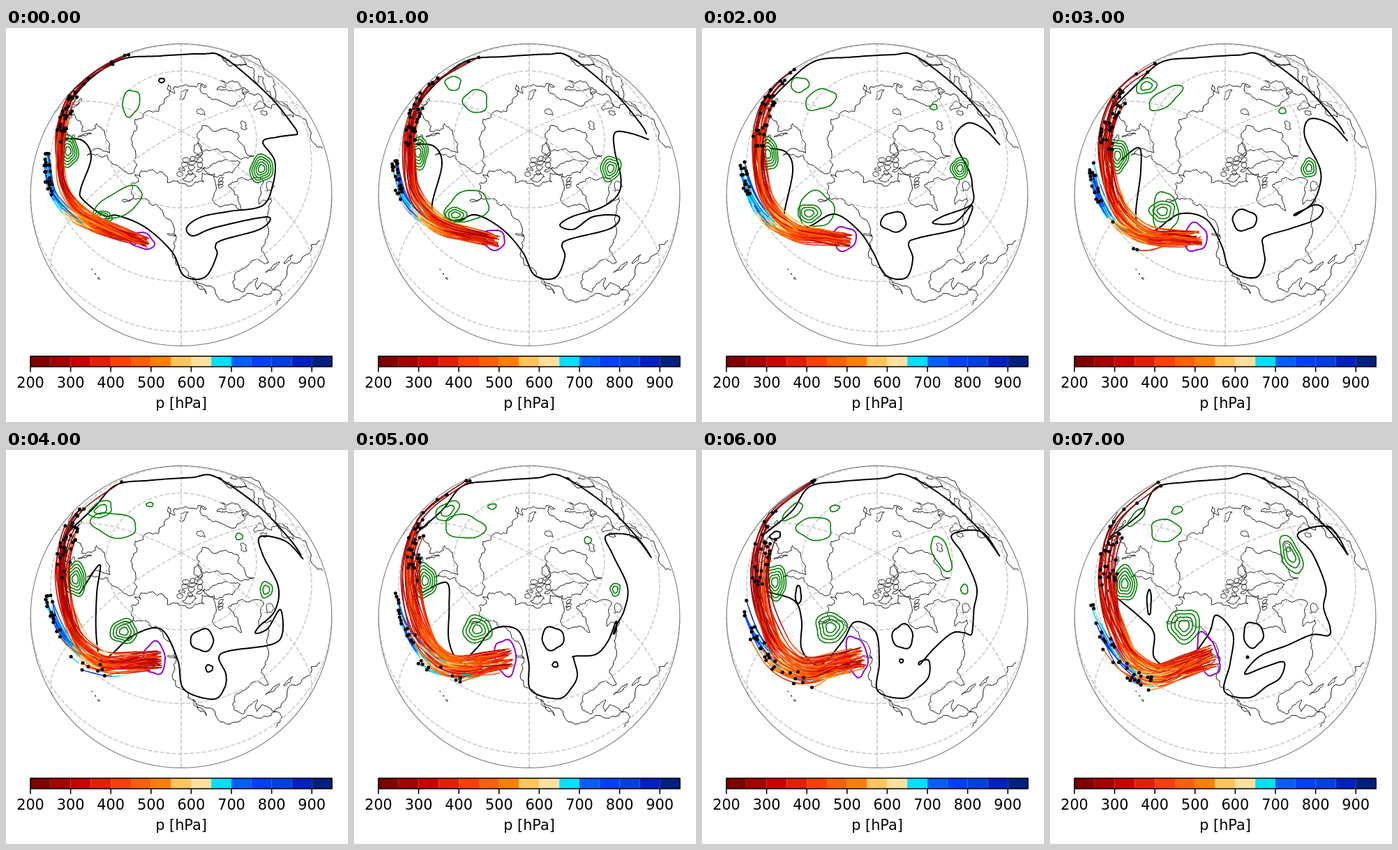
These frames come from a looping animation (490x563 px, 8 s). An HTML page with a canvas:

```html
<!DOCTYPE html>
<html lang="en">
<head>
<meta charset="utf-8">
<title>Air parcel trajectories</title>
<style>
html, body { margin: 0; width: 490px; height: 563px; overflow: hidden; background: #fff; }
canvas { display: block; }
</style>
</head>
<body>
<canvas id="stage" width="490" height="563"></canvas>
<script>
const ctx = document.getElementById('stage').getContext('2d');
const CX = 251, CY = 238.3, R = 215.8, RAD = Math.PI / 180, LAST = 7;
const SIN0 = Math.sin(65 * RAD), COS0 = Math.cos(65 * RAD), LON0 = -120;
const COLORS = ['#800000', '#a40000', '#c80000', '#e02000', '#ff4000', '#ff6000', '#ff8000', '#ffc55a',
  '#ffdf9f', '#00dfff', '#0060ff', '#0040ff', '#0040df', '#0020bf', '#002080'];

const pairs = flat => flat.flatMap((v, i) => i % 2 ? [] : [[v, flat[i + 1]]]);
const lerp = (a, b, f) => a + (b - a) * f;
const mix = (a, b, f) => a.map((v, i) => lerp(v, b[i], f));
const clamp = (v, low, high) => Math.max(low, Math.min(high, v));

function random(seed) {
  return () => {
    seed = seed + 0x6D2B79F5 | 0;
    let t = Math.imul(seed ^ seed >>> 15, 1 | seed);
    t = t + Math.imul(t ^ t >>> 7, 61 | t) ^ t;
    return ((t ^ t >>> 14) >>> 0) / 4294967296;
  };
}

// Catmull-Rom curve through a flat list, sampled at n points
function spline(flat, n) {
  const p = pairs(flat), last = p.length - 1;
  const at = i => p[clamp(i, 0, last)];
  return Array.from({ length: n }, (_, k) => {
    const u = k / (n - 1) * last, i = Math.min(last - 1, Math.floor(u)), f = u - i;
    return [0, 1].map(c => {
      const [a, b, d, e] = [at(i - 1)[c], at(i)[c], at(i + 1)[c], at(i + 2)[c]];
      return b + f / 2 * (d - a + f * (2 * a - 5 * b + 4 * d - e + f * (3 * (b - d) + e - a)));
    });
  });
}

// Orthographic view; null on the far side
function project(lon, lat) {
  const d = (lon - LON0) * RAD, s = Math.sin(lat * RAD), c = Math.cos(lat * RAD);
  if (SIN0 * s + COS0 * c * Math.cos(d) < 0) return null;
  return [CX + R * c * Math.sin(d), CY - R * (COS0 * s - SIN0 * c * Math.cos(d))];
}

function line(points, color, width, closed) {
  ctx.beginPath();
  let pen = false;
  for (const p of points) {
    if (p) pen ? ctx.lineTo(p[0], p[1]) : ctx.moveTo(p[0], p[1]);
    pen = !!p;
  }
  if (closed) ctx.closePath();
  ctx.strokeStyle = color;
  ctx.lineWidth = width;
  ctx.stroke();
}

// Midpoint displacement gives straight pieces a ragged look
function rough(points, rnd, levels, amount) {
  for (; levels--;) {
    points = points.flatMap((p, i) => {
      const q = points[i + 1];
      if (!p || !q) return [p];
      const k = (rnd() - .5) * amount, dx = q[0] - p[0], dy = q[1] - p[1];
      return [p, [(p[0] + q[0]) / 2 - dy * k, (p[1] + q[1]) / 2 + dx * k]];
    });
  }
  return points;
}

const coasts = [], noise = random(5);
const coast = (...flat) => coasts.push(rough(pairs(flat).map(p => project(...p)), noise, 3, .5));

// Ragged oval; sizes and centre in degrees, stretched with the parallels
function island(lon, lat, width, height, slant = 0) {
  const flat = [];
  for (let a = 0; a < 6; a++) {
    const size = .75 + noise() * .5, v = Math.sin(a * 60 * RAD) * size;
    flat.push(lon + (Math.cos(a * 60 * RAD) * size * width + v * slant) / Math.cos(lat * RAD), lat + v * height);
  }
  coast(...flat, flat[0], flat[1]);
}

// North America, west, north and east
coast(-81, -4, -78, 2, -80, 8, -86, 11, -95, 16, -105, 20, -114.8, 31.7, -109.5, 23, -117, 32.5, -122.5, 37.5,
  -124, 46, -123, 49, -133, 57.5, -140, 59.8, -148, 60.5, -154, 59, -163, 54.8, -157.5, 58.7, -165, 62,
  -161, 64.4, -168, 65.6, -162, 66.3, -166, 68.3, -156.5, 71.3);
coast(-156.5, 71.3, -135, 69, -128, 70.2, -114, 68.3, -96, 68.2, -94, 71.5, -82, 69, -86, 66.2, -94.5, 59,
  -82.5, 55, -80, 51.3, -76.8, 56.5, -77.5, 62.4, -70, 61, -64.5, 60.3, -56, 52.5, -69, 48.3, -64.5, 47, -61, 46,
  -66, 44, -70, 42, -75.7, 35.2, -81, 32, -80.5, 25.2, -84, 30, -95, 29.2, -97.7, 22.5, -94, 18.2, -90, 21,
  -87, 21.5, -88.5, 15.9, -84, 15.8, -81, 9, -75.5, 10.7, -62, 10.5, -52, 5);
// Greenland
coast(-73, 78.2, -55, 82.3, -35, 83.5, -12, 81.4, -22, 72.5, -38, 65.8, -43.5, 60, -52, 64.5, -51, 69.5, -60, 76, -73, 78.2);
// Africa and Europe
coast(-17, 15, -14, 26, -6, 35.8, 10, 37.2, 11, 34, 20, 31, 34, 31.3, 36, 36.5, 27, 37, 29, 41, 41, 41.5,
  31, 46.5, 28, 41.5, 23, 37, 13.5, 45.5, 18, 40, 16, 38, 9, 44.2, 0, 40, -2, 37, -9, 37.2, -9, 43, -1.5, 44,
  -4.7, 48.4, 8, 54, 10.5, 57.5, 10, 54.2, 19, 54.4, 23.5, 59.2, 29, 59.8, 22, 61, 25, 65.3, 17.5, 62, 13, 55.5,
  7, 58, 5, 61, 18, 69.5, 26, 71, 41, 66.7, 35, 66.5, 44, 66.3);
// Northern and eastern Asia
coast(44, 66.3, 44, 68.5, 67, 69, 68, 72.5, 73, 67.5, 74.5, 72.8, 104, 77.6, 113, 74, 130, 71, 152, 71, 180, 69,
  190, 66, 177.5, 62.5, 164, 60, 156.7, 51, 156, 57, 162, 61, 142, 59, 136, 54.5, 141, 53, 140, 48, 127.5, 39.5,
  129.3, 36, 126.5, 34.5, 122, 39, 118, 38.5, 122, 37, 120, 34, 122, 30.5, 110, 21);
coast(130, 31.5, 136, 35.7, 140, 41, 142, 39.5, 140, 35, 130, 31.5);

island(-79, 21.5, 4, .6, -1);
island(-71, 19, 2.2, .7);
island(-56, 49, 2, 2);
island(-125.5, 49.5, 1.6, .5, -.6);
island(-19, 65, 2.2, 1.2);
island(-2.5, 54, 1.3, 4, -1);
island(-8, 53.3, 1.3, 1.6);
island(18, 78.5, 1.8, 1.3);
island(57, 73.5, 1, 2.8, 1);
island(143, 43.3, 1.7, 1.2);
island(142.6, 50, .5, 4);
for (let i = 0; i < 3; i++) island(-155.5 - i * 2, 19.6 + i, .5 / (i + 1), .5 / (i + 1));
// Baffin, Victoria, Ellesmere, then the scattered archipelago
island(-73, 69, 4, 5, -4.5);
island(-110, 71, 2.3, 1.6);
island(-78, 80, 2, 2.5, 1);
for (let i = 0; i < 12; i++) island(-122 + i * 3.4, 73 + (i % 4) * 1.7, .8 + noise(), .5 + noise() * .7);
for (let i = 0; i < 3; i++) island(-84 + i * 2, 63.8 + i, 1.2, .7);

// Contour shapes at a few moments, with matching points
const north = [
  [85,115, 118,75, 165,45, 220,40, 280,37, 312,42, 375,95, 412,140, 418,152],
  [85,125, 130,90, 152,54, 195,46, 255,41, 290,35, 350,68, 400,115, 427,150]
];
const south = {
  0: [418,152, 388,156, 368,163, 385,190, 382,225, 367,254, 320,262, 280,270, 259,285, 268,297, 300,285, 374,270,
    365,287, 310,303, 300,312, 302,325, 285,356, 255,354, 238,320, 200,285, 160,268, 140,268, 110,245, 107,230,
    122,185, 108,160, 72,160],
  2: [427,167, 405,145, 380,136, 362,160, 383,205, 387,225, 386,252, 345,269, 331,279, 362,278, 386,254, 384,268,
    370,286, 310,300, 296,308, 302,330, 292,357, 263,353, 245,320, 225,290, 190,266, 155,283, 128,290, 117,272,
    130,205, 121,178, 98,172],
  4: [426,156, 400,130, 364,124, 368,150, 390,195, 385,230, 362,253, 358,262, 375,255, 393,228, 396,262, 380,278,
    320,287, 305,297, 315,320, 313,340, 297,356, 255,342, 246,300, 222,256, 182,265, 150,293, 135,298, 129,260,
    130,205, 134,164, 105,206],
  7: [427,150, 400,110, 355,120, 376,148, 395,195, 392,225, 401,252, 399,265, 375,264, 340,279, 300,295, 279,320,
    308,310, 335,303, 330,325, 310,338, 285,354, 250,345, 258,305, 262,262, 238,236, 226,265, 185,312, 150,298,
    149,262, 130,240, 82,200]
};

function southAt(step) {
  const times = Object.keys(south).map(Number);
  const b = times.find(t => t >= step), a = times.filter(t => t <= step).pop();
  return mix(south[a], south[b], a === b ? 0 : (step - a) / (b - a));
}

// Closed contours [x, y, rx, ry, rings, turn] drift from one state to another
const tracks = [];
const track = (color, from, to, start, end = start) => tracks.push({ color, from, to, start, end });
const GREEN = '#008000', BLACK = '#000', PURPLE = '#9400d3';
track(GREEN, 0, 7, [89, 176, 14, 23, 5, 0], [107, 191, 17, 25, 5, 0]);
track(GREEN, 0, 7, [138, 270, 14, 8, 3, 0], [192, 251, 23, 24, 4, 0]);
track(GREEN, 0, 6, [366, 201, 16, 20, 5, .3], [376, 199, 5, 7, 1, 0]);
track(GREEN, 0, 3, [161, 251, 39, 17, 1, -.5], [165, 264, 18, 30, 1, 0]);
track(GREEN, 0, 3, [179, 107, 12, 19, 1, .2], [165, 100, 28, 11, 1, -.6]);
track(GREEN, 4, 7, [155, 107, 33, 17, 1, .2], [165, 115, 21, 16, 1, 0]);
track(GREEN, 1, 5, [142, 79, 11, 10, 1, 0], [134, 87, 19, 11, 2, -.6]);
track(GREEN, 6, 7, [130, 88, 18, 7, 1, -.7], [124, 96, 17, 6, 1, -.8]);
track(GREEN, 2, 5, [332, 113, 5, 4, 1, 0], [335, 129, 5, 5, 1, 0]);
track(GREEN, 6, 7, [343, 148, 11, 27, 1, -.4], [345, 150, 13, 29, 3, -.4]);
track(GREEN, 4, 7, [206, 78, 5, 3, 1, 0], [182, 86, 8, 5, 1, -.4]);
track(BLACK, 0, 0, [223, 75, 4, 3, 1, 0]);
track(BLACK, 2, 7, [275, 277, 18, 14, 1, 0], [291, 264, 14, 18, 1, 0]);
track(BLACK, 4, 7, [291, 312, 5, 5, 1, 0], [283, 296, 1.5, 1.5, 1, 0]);
track(BLACK, 6, 7, [138, 207, 4, 13, 1, 0], [142, 217, 3, 18, 1, 0]);
track(BLACK, 6, 7, [105, 122, 8, 5, 1, -.4], [90, 130, 8, 5, 1, -.8]);
track(PURPLE, 0, 7, [195, 304, 18, 11, 1, .3], [226, 293, 14, 32, 1, -.28]);

function ring([x, y, rx, ry, count, turn], color) {
  const n = Math.round(count), cos = Math.cos(turn), sin = Math.sin(turn);
  for (let k = 0; k < n; k++) {
    const points = Array.from({ length: 48 }, (_, i) => {
      const a = i * Math.PI / 24;
      const size = (1 - k / n * .9) * (1 + .07 * Math.sin(3 * a + x) + .04 * Math.sin(5 * a + y));
      const u = rx * size * Math.cos(a), v = ry * size * Math.sin(a);
      return [x + u * cos - v * sin, y + u * sin + v * cos];
    });
    line(points, color, color === GREEN ? 1.6 : 2, true);
  }
}

// The air stream, from its head back along the rim of the globe
const stream = [
  [205,308, 170,294, 130,277, 100,255, 82,225, 77,185, 78,145, 92,102, 122,68, 180,38],
  [236,293, 197,306, 152,317, 118,299, 97,267, 81,225, 75,175, 84,122, 108,86, 160,46]
];
const N = 90;

// Parcels in the stream: where they end, their side offset there, and their pressure
function parcels(t, rnd) {
  const list = [], add = (count, make) => { for (let i = 0; i < count; i++) list.push(make()); };
  add(26, () => {
    const base = 230 + 220 * rnd();
    return { end: .62 + .2 * rnd(), side: lerp(-5, 10 + 14 * t, rnd()),
      pressure: u => base + 150 * Math.exp(-(((u - .4) / .2) ** 2)) };
  });
  add(6, () => ({ end: .8 + .2 * rnd(), side: 8 * rnd() - 4, pressure: u => 290 + 70 * Math.sin(u * 5) }));
  add(lerp(26, 7, t), () => {
    const base = 330 + 120 * rnd(), tail = 640 + 230 * rnd();
    return { end: .43 + .15 * rnd(), side: -14 - 10 * rnd(),
      pressure: u => lerp(base, tail, clamp((u - .35) * 2.2, 0, 1)) };
  });
  add(26 * Math.max(0, 1.6 * t - .6), () => {
    const base = 350 + 130 * rnd(), tail = 430 + 400 * rnd() ** 2;
    return { end: .2 + .25 * rnd(), side: -8 - 20 * rnd(), pressure: u => lerp(base, tail, u) };
  });
  return list;
}

function keepOnGlobe([x, y]) {
  const k = Math.min(1, (R - 1) / Math.hypot(x - CX, y - CY));
  return [CX + (x - CX) * k, CY + (y - CY) * k];
}

function drawStream(step) {
  const t = step / LAST, rnd = random(41 + step), spine = spline(mix(...stream, t), N), width = lerp(7, 17, t);
  const trails = parcels(t, rnd).map(({ end, side, pressure }) => {
    const head = (2 * rnd() - 1) * width, start = Math.floor(rnd() * 7), phase = rnd() * 6;
    const stop = Math.round(end * (N - 1)), points = [], levels = [];
    for (let k = start; k <= stop; k++) {
      const u = k / stop, a = spine[Math.max(0, k - 1)], b = spine[Math.min(N - 1, k + 1)];
      const dx = b[0] - a[0], dy = b[1] - a[1], len = Math.hypot(dx, dy);
      const off = (lerp(head, side, u) + 4 * Math.sin(u * 6 + phase) * Math.sin(u * Math.PI)) / len;
      points.push(keepOnGlobe([spine[k][0] - dy * off, spine[k][1] + dx * off]));
      const p = pressure(u) + 45 * Math.sin(u * 8 + phase);
      levels.push(clamp(Math.floor((p - 200) / 50), 0, COLORS.length - 1));
    }
    return { points, levels, order: rnd() };
  });
  trails.sort((a, b) => a.order - b.order);
  for (const { points, levels } of trails) {
    for (let i = 0, j; i < points.length - 1; i = j) {
      for (j = i + 1; j < points.length - 1 && levels[j] === levels[i];) j++;
      line(points.slice(i, j + 1), COLORS[levels[i]], 1.5);
    }
  }
  ctx.fillStyle = BLACK;
  for (const { points } of trails) {
    ctx.beginPath();
    ctx.arc(...points[points.length - 1], 2.5, 0, 7);
    ctx.fill();
  }
}

function drawGrid() {
  const span = (from, to, f) => Array.from({ length: 121 }, (_, i) => f(lerp(from, to, i / 120)));
  ctx.setLineDash([6, 2.6]);
  for (const lat of [0, 30, 60]) line(span(-300, 60, lon => project(lon, lat)), '#cacaca', 1.6);
  for (let lon = -120; lon < 240; lon += 60) line(span(90, -30, lat => project(lon, lat)), '#cacaca', 1.6);
  ctx.setLineDash([]);
}

function drawColorbar() {
  const left = 35, cell = 28.8;
  COLORS.forEach((c, i) => {
    ctx.fillStyle = c;
    ctx.fillRect(left + i * cell, 469, cell, 15);
  });
  ctx.strokeStyle = ctx.fillStyle = BLACK;
  ctx.lineWidth = 1.6;
  ctx.strokeRect(left, 469, 432, 15);
  ctx.font = '20.8px "DejaVu Sans", sans-serif';
  ctx.textAlign = 'center';
  for (let p = 200; p <= 900; p += 100) {
    const x = left + (p - 200) / 50 * cell;
    line([[x, 484], [x, 491.5]], BLACK, 1.6);
    ctx.fillText(p, x, 514);
  }
  ctx.fillText('p [hPa]', CX, 543);
}

function draw(step) {
  ctx.fillStyle = '#fff';
  ctx.fillRect(0, 0, 490, 563);
  ctx.lineJoin = 'round';
  coasts.forEach(c => line(c, BLACK, .9));
  drawGrid();
  ctx.beginPath();
  ctx.arc(CX, CY, R, 0, 7);
  ctx.strokeStyle = '#7a7a7a';
  ctx.lineWidth = 1.1;
  ctx.stroke();
  line(spline(mix(...north, step / LAST), 120), BLACK, 2);
  line(spline(southAt(step), 300), BLACK, 2);
  for (const { color, from, to, start, end } of tracks) {
    if (step >= from && step <= to) ring(mix(start, end, (step - from) / (to - from || 1)), color);
  }
  drawStream(step);
  drawColorbar();
}

let shown = -1;
function tick(now) {
  const step = Math.floor(now / 1000) % (LAST + 1);
  if (step !== shown) draw(shown = step);
  requestAnimationFrame(tick);
}
draw(shown = 0);
requestAnimationFrame(tick);
</script>
</body>
</html>
```
